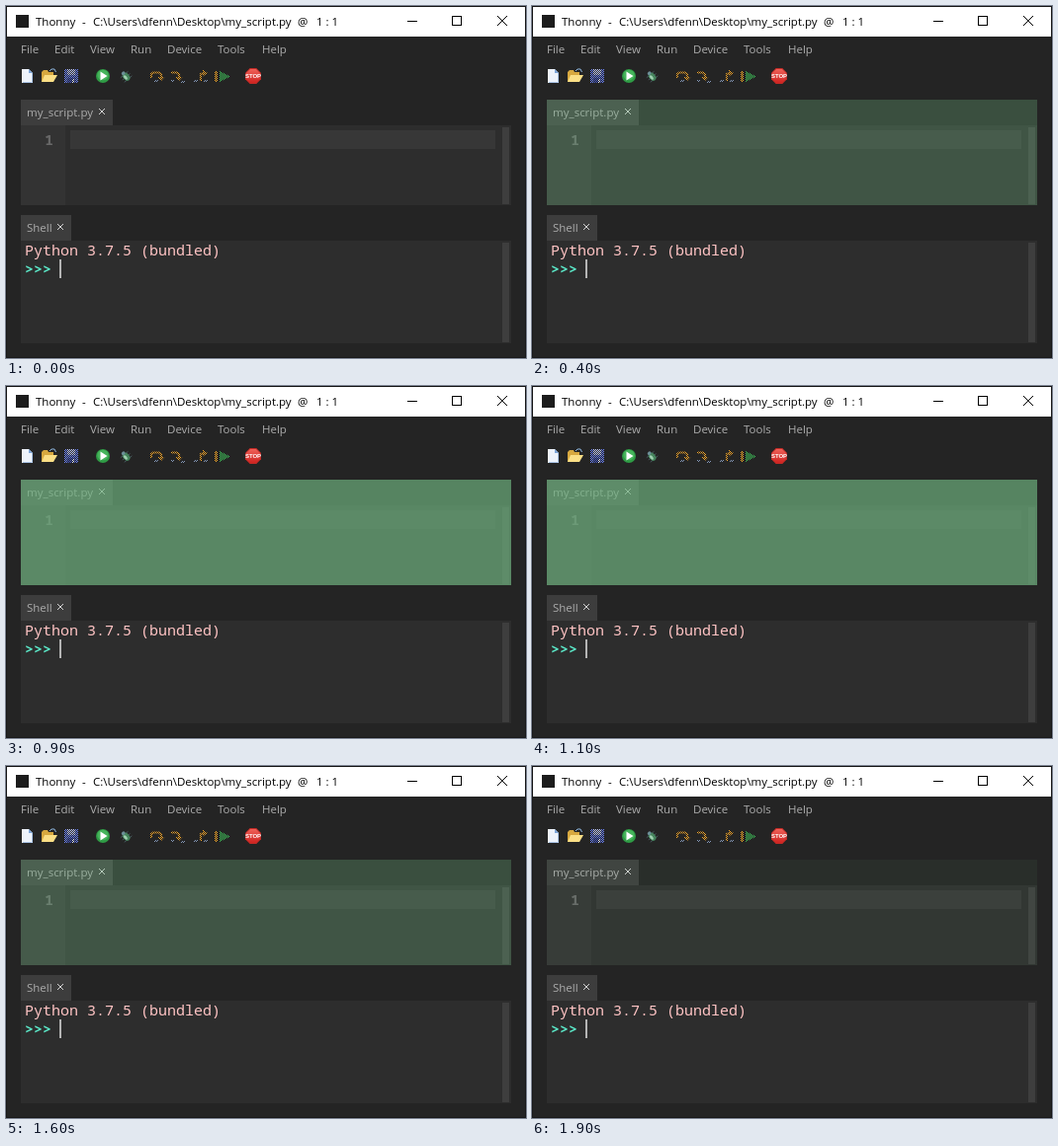
Animation, 526 px wide and 357 px high, one loop 2 s. Source, as an HTML page with a canvas:

```html
<!DOCTYPE html>
<html lang="en">
<head>
<meta charset="utf-8">
<title>Editor highlight</title>
<style>
  html, body { margin: 0; width: 100%; height: 100%; overflow: hidden; background: #242424; }
  canvas { position: absolute; left: 0; top: 0; display: block; }
  #glow { position: absolute; left: 15px; top: 95px; width: 496px; height: 107px; background: rgb(110, 178, 126); opacity: 0; }
</style>
</head>
<body>
<canvas id="stage" width="526" height="357"></canvas>
<div id="glow"></div>
<script>
const ctx = document.getElementById('stage').getContext('2d');
const glow = document.getElementById('glow');
const UI = '11.5px "Open Sans", "Noto Sans", sans-serif';
const MONO = '15px "Noto Sans Mono", "DejaVu Sans Mono", monospace';
const WINDOW = '#242424';
const LABEL = '#acacac';
const LOOP = 2000, STEP = 100, PEAK = 0.75;

function box(x, y, w, h, color) {
  ctx.fillStyle = color;
  ctx.fillRect(x, y, w, h);
}

function text(str, x, y, color, font = UI) {
  ctx.font = font;
  ctx.fillStyle = color;
  ctx.fillText(str, x, y);
}

function trace(points) {
  ctx.beginPath();
  points.forEach(([x, y], i) => i ? ctx.lineTo(x, y) : ctx.moveTo(x, y));
}

function shape(points, color) {
  trace(points);
  ctx.closePath();
  ctx.fillStyle = color;
  ctx.fill();
}

function line(points, color, width = 1) {
  trace(points);
  ctx.strokeStyle = color;
  ctx.lineWidth = width;
  ctx.stroke();
}

function disc(x, y, rx, ry, color) {
  ctx.beginPath();
  ctx.ellipse(x, y, rx, ry, 0, 0, Math.PI * 2);
  ctx.fillStyle = color;
  ctx.fill();
}

function cross(x, y, r, color) {
  line([[x - r, y - r], [x + r, y + r]], color);
  line([[x - r, y + r], [x + r, y - r]], color);
}

// Checkered veil used for disabled toolbar icons
function stipple(x, y, w, h) {
  for (let j = 0; j < h; j++)
    for (let i = j % 2; i < w; i += 2) box(x + i, y + j, 1, 1, WINDOW);
}

function titleBar() {
  box(0, 0, 526, 357, '#171717');
  box(1, 1, 524, 30, '#ffffff');
  box(1, 31, 524, 325, WINDOW);
  box(10, 9, 13, 13, '#1c1c1c');
  text('Thonny', 30, 20, '#000');
  text('-', 77, 20, '#000');
  text('C:\\Users\\dfenn\\Desktop\\my_script.py', 88, 20, '#000');
  text('@', 295, 20, '#000');
  text('1 : 1', 314, 20, '#000');
  box(406, 15, 10, 1, '#000');
  ctx.strokeStyle = '#000';
  ctx.lineWidth = 1;
  ctx.strokeRect(451.5, 10.5, 9, 9);
  cross(502, 15, 5, '#000');
}

function menu() {
  const items = { File: 15, Edit: 49, View: 85, Run: 126, Device: 163, Tools: 214, Help: 259 };
  for (const [name, x] of Object.entries(items)) text(name, x, 48, LABEL);
}

function fileIcons() {
  shape([[16, 64], [23, 64], [27, 68], [27, 78], [16, 78]], '#eef3fb');
  shape([[23, 64], [27, 68], [23, 68]], '#7ba4d8');
  line([[26.5, 68], [26.5, 77.5], [17, 77.5]], '#a9c3e6');

  shape([[36, 77], [36, 67], [38, 65], [42, 65], [43, 67], [48, 67], [48, 77]], '#d7a83f');
  shape([[39, 70], [52, 70], [48, 77], [36, 77]], '#fbdf86');
  line([[44, 66], [46, 64], [49, 64], [50.5, 67]], '#8eb6df');

  box(59, 64, 14, 14, '#6a80f0');
  box(62, 64, 8, 6, '#c3cdfa');
  box(62, 73, 8, 5, '#4457c4');
  box(67, 74, 2, 4, '#dfe5ff');
  stipple(59, 64, 14, 14);
}

function runIcons() {
  disc(98, 71, 7, 7, '#2f9b45');
  disc(98, 70, 5.6, 5.2, '#46b45b');
  shape([[95.5, 66.5], [102.5, 71], [95.5, 75.5]], '#fff');

  ctx.save();
  ctx.translate(121, 71);
  ctx.rotate(-0.7);
  for (const y of [-2, 1, 4]) line([[-5, y], [5, y]], '#4d6168', 0.8);
  disc(0, 1, 3.2, 4.4, '#45845c');
  disc(-1, 1, 1.4, 2.6, '#9fd0b0');
  disc(0, -3.6, 2, 1.7, '#6c8f98');
  ctx.restore();
}

function stepIcons() {
  const gold = '#f0a428', steel = '#8194b4';
  line([[147, 73], [147, 69], [149, 67.5], [155, 67.5], [157, 69], [157, 73]], gold, 2.2);
  shape([[153.5, 72], [160.5, 72], [157, 76]], gold);
  box(150, 75, 4, 2, steel);

  line([[167, 67.5], [173, 67.5], [175, 69], [175, 73]], gold, 2.2);
  shape([[171.5, 72], [178.5, 72], [175, 76]], gold);
  box(167, 75, 3, 2, steel);
  box(177, 76, 4, 2, steel);

  line([[197, 76], [197, 69], [200, 68]], gold, 2.2);
  shape([[199, 64.5], [204, 68], [199, 71.5]], gold);
  box(190, 75, 4, 2, steel);
  box(200, 75, 4, 2, steel);

  box(211, 66, 3, 11, gold);
  shape([[216, 66], [227, 71.5], [216, 77]], '#3fc65b');

  for (const x of [145, 165, 189, 211]) stipple(x, 64, 17, 15);
}

function stopIcon() {
  const octagon = r => Array.from({ length: 8 }, (_, i) => {
    const a = (i + 0.5) * Math.PI / 4;
    return [250 + r * Math.cos(a), 71 + r * Math.sin(a)];
  });
  const red = ctx.createLinearGradient(0, 63, 0, 79);
  red.addColorStop(0, '#f0655c');
  red.addColorStop(1, '#cc1f1c');
  shape(octagon(8.6), '#c22a26');
  shape(octagon(7.7), red);
  ctx.textAlign = 'center';
  text('STOP', 250, 73.3, '#fff', 'bold 6px "Liberation Sans", Arial, sans-serif');
  ctx.textAlign = 'left';
}

function tab(label, y, width, closeX) {
  box(15, y, 496, 26, WINDOW);
  box(15, y, width, 26, '#3d3d3d');
  text(label, 21, y + 17, LABEL);
  cross(closeX, y + 12, 3, '#d4d4d4');
}

function pane(y, h) {
  box(15, y, 496, h, '#2d2d2d');
  box(502, y + 2, 7, h - 3, '#3e3e3e');
}

function editor() {
  tab('my_script.py', 95, 93, 97);
  pane(121, 81);
  box(15, 121, 45, 81, '#333333');
  box(65, 126, 430, 19, '#373737');
  text('1', 39, 141, '#686868', 'bold ' + MONO);
}

function shell() {
  tab('Shell', 212, 51, 55);
  pane(238, 104);
  text('Python 3.7.5 (bundled)', 19, 253, '#ffc4c4', '500 ' + MONO);
  text('>>>', 19, 272, '#5be8c8', 'bold ' + MONO);
  box(54, 257, 2, 19, '#b4b4b4');
}

function tick() {
  const t = Math.floor(performance.now() % LOOP / STEP) * STEP;
  glow.style.opacity = PEAK * (1 - Math.abs(t * 2 / LOOP - 1));
  requestAnimationFrame(tick);
}

[titleBar, menu, fileIcons, runIcons, stepIcons, stopIcon, editor, shell].forEach(draw => draw());
tick();
</script>
</body>
</html>
```
